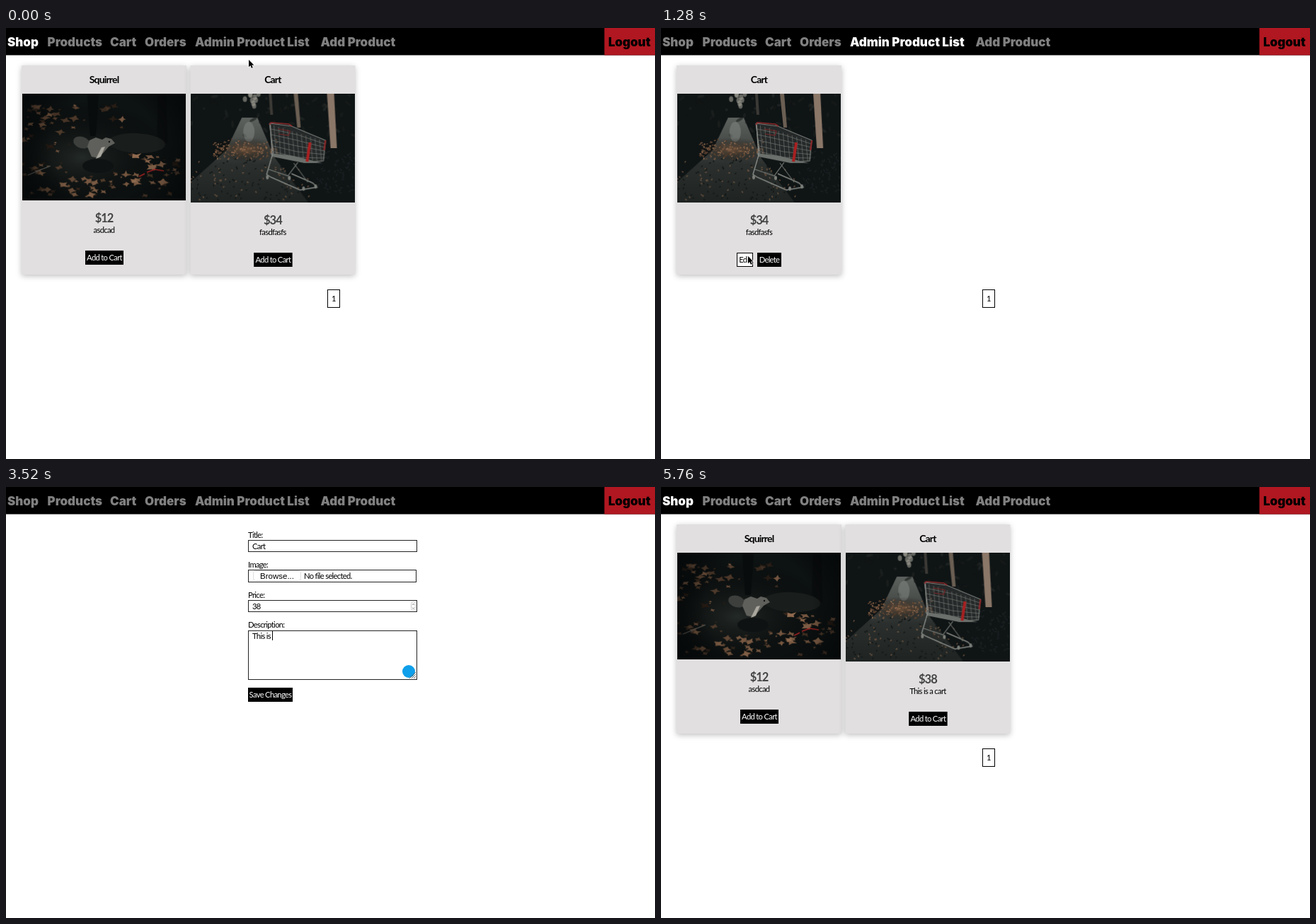
Animation, 917 px wide and 610 px high, one loop 5.92 s. Source, as an HTML page with a canvas:

```html
<!DOCTYPE html>
<html lang="en">
<head>
<meta charset="utf-8">
<title>Shop</title>
<style>
html, body { margin: 0; width: 100%; height: 100%; overflow: hidden; background: #fff; }
canvas { display: block; }
</style>
</head>
<body>
<canvas id="stage" width="917" height="610"></canvas>
<script>
const ctx = document.getElementById('stage').getContext('2d');
const LOOP = 5920;
const GREY = '#808080';

function rng(seed) {
  return () => (seed = (seed * 16807) % 2147483647) / 2147483647;
}

function box(x, y, w, h, fill, stroke) {
  ctx.fillStyle = fill;
  ctx.fillRect(x, y, w, h);
  if (stroke) {
    ctx.strokeStyle = stroke;
    ctx.lineWidth = 1;
    ctx.strokeRect(x + .5, y + .5, w - 1, h - 1);
  }
}

function setFont(weight, size, family, spacing = 0) {
  ctx.font = `${weight} ${size}px ${family}, sans-serif`;
  ctx.letterSpacing = spacing + 'px';
}

// Tight tracking gives the narrow look of the body type.
function text(str, x, y, size = 11.2, color = '#000', align = 'left', weight = 400) {
  setFont(weight, size, 'Lato', -.06 * size);
  ctx.textAlign = align;
  ctx.fillStyle = color;
  ctx.fillText(str, x, y);
}

function button(label, x, y, w, h, hover) {
  box(x, y, w, h, hover ? '#fff' : '#000', '#000');
  text(label, x + w / 2, y + h - 6, 11.2, hover ? '#000' : '#fff', 'center');
}

function picture(w, h, paint) {
  const c = document.createElement('canvas');
  c.width = w;
  c.height = h;
  paint(c.getContext('2d'), w, h);
  return c;
}

function glow(g, x, y, r, color, squash = 1) {
  g.save();
  g.translate(x, y);
  g.scale(1, squash);
  const grad = g.createRadialGradient(0, 0, 0, 0, 0, r);
  grad.addColorStop(0, color);
  grad.addColorStop(1, 'transparent');
  g.fillStyle = grad;
  g.fillRect(-r, -r, 2 * r, 2 * r);
  g.restore();
}

function blob(g, x, y, rx, ry, turn, color) {
  g.fillStyle = color;
  g.beginPath();
  g.ellipse(x, y, rx, ry, turn, 0, 7);
  g.fill();
}

function path(g, pts, color, width, fill) {
  g.beginPath();
  for (let i = 0; i < pts.length; i += 2) g.lineTo(pts[i], pts[i + 1]);
  if (fill) {
    g.fillStyle = fill;
    g.fill();
  }
  if (color) {
    g.strokeStyle = color;
    g.lineWidth = width;
    g.stroke();
  }
}

function brown(tone) {
  return `rgb(${tone | 0},${tone * .74 | 0},${tone * .55 | 0})`;
}

function leaf(g, rand, x, y, r, tone) {
  const pts = [], turn = rand() * 6;
  for (let i = 0; i < 8; i++) {
    const a = turn + i * Math.PI / 4;
    const d = r * (i % 2 ? .3 + rand() * .3 : .7 + rand() * .5);
    pts.push(x + d * Math.cos(a), y + d * .6 * Math.sin(a));
  }
  path(g, pts, null, 0, brown(tone));
}

const squirrelPic = picture(231, 151, (g, w, h) => {
  const rand = rng(41);
  g.fillStyle = '#0d1212';
  g.fillRect(0, 0, w, h);
  glow(g, 85, 90, 130, '#242a28', .6);
  for (let i = 0; i < 170; i++) {
    const x = rand() * 222, y = 14 + rand() * 132;
    const size = 2 + rand() * 6, tone = 35 + rand() * 85;
    const near = x > 68 && x < 150 && y > 52 && y < 112;
    const dark = x > 150 && y < 85 || x > 88 && x < 112 && y < 60;
    if (!near && !dark) leaf(g, rand, x, y, size, tone);
  }
  path(g, [92, 0, 108, 0, 104, 60, 96, 60], null, 0, '#090c0d');
  path(g, [192, 0, 203, 0, 205, 70, 190, 70], null, 0, '#0a0d0e');
  blob(g, 162, 70, 40, 14, .05, '#191d1b');
  blob(g, 107, 102, 22, 10, 0, '#0e1212');
  for (let i = 0; i < 12; i++) {
    leaf(g, rand, 140 + rand() * 58, 88 + rand() * 45, 6 + rand() * 4, 115 + rand() * 35);
    leaf(g, rand, 25 + rand() * 80, 115 + rand() * 28, 5 + rand() * 3, 95 + rand() * 35);
  }
  path(g, [176, 111, 187, 107, 200, 109], '#9c2222', 1.6);
  path(g, [165, 117, 173, 113], '#9c2222', 1.6);
  path(g, [8, 115, 40, 102], '#777873', 1);
  blob(g, 84, 69, 12, 8, .3, '#3c3f3c');
  path(g, [92, 75, 95, 66, 104, 62, 113, 65, 118, 62, 126, 64, 131, 70, 122, 75, 116, 82, 108, 91, 98, 89], null, 0, '#5f605b');
  path(g, [112, 76, 117, 75, 111, 89, 104, 92], null, 0, '#aaa79e');
  blob(g, 123, 68, 1.2, 1.2, 0, '#111');
  const edge = g.createRadialGradient(w / 2, h / 2, 75, w / 2, h / 2, 150);
  edge.addColorStop(0, 'transparent');
  edge.addColorStop(1, 'rgba(4,7,9,.9)');
  g.fillStyle = edge;
  g.fillRect(0, 0, w, h);
});

const cartPic = picture(231, 154, (g, w, h) => {
  const rand = rng(77);
  g.fillStyle = '#0f1415';
  g.fillRect(0, 0, w, h);
  const ground = g.createLinearGradient(0, 34, 0, h);
  ground.addColorStop(0, '#5d625e');
  ground.addColorStop(.3, '#474b48');
  ground.addColorStop(.55, '#2b2f2d');
  ground.addColorStop(1, '#1f2423');
  path(g, [72, 34, 94, 34, 118, 90, 166, 154, 0, 154, 0, 125, 50, 80], null, 0, ground);
  for (let i = 0; i < 60; i++) {
    const tone = 18 + rand() * 24;
    blob(g, rand() * w, rand() * 60, 2 + rand() * 4, 2, rand() * 3, `rgba(${tone},${tone + 4},${tone + 2},.6)`);
  }
  blob(g, 82, 54, 8, 14, 0, 'rgba(125,130,126,.6)');
  for (let i = 0; i < 9; i++) blob(g, 76 + rand() * 22, rand() * 18, 3, 4, 0, 'rgba(160,158,148,.6)');
  path(g, [192, 0, 202, 0, 206, 77, 197, 77], null, 0, '#8b7768');
  path(g, [145, 0, 151, 0, 155, 48, 150, 48], null, 0, '#6b5f53');
  path(g, [110, 0, 114, 0, 116, 30, 112, 30], null, 0, '#3c3a36');
  glow(g, 78, 79, 48, 'rgba(120,84,56,.8)', .35);
  for (let i = 0; i < 190; i++) {
    const x = 32 + rand() * 90, y = 64 + (rand() + rand()) * 16;
    blob(g, x, y, 1.5, .8, rand() * 3, brown(75 + rand() * 80));
  }
  for (let i = 0; i < 150; i++) {
    blob(g, rand() * 170, 92 + rand() * 58, 1.5, .8, rand() * 3, rand() < .4 ? '#6c5440' : '#121716');
  }
  for (let i = 0; i < 70; i++) blob(g, 170 + rand() * 61, 80 + rand() * 60, 2.5, 1, rand() * 3, '#1a2021');
  // shopping cart
  path(g, [111, 42, 142, 46, 190, 66, 187, 95, 160, 97, 117, 87, 111, 42], '#7d807c', 1.1, 'rgba(70,73,70,.4)');
  for (let i = 1; i < 12; i++) {
    const x = 111 + i * 6.4;
    path(g, [x, 43 + i * 2, x + 3, 87 + i * .8], '#777b77', .6);
  }
  for (let i = 1; i < 6; i++) {
    path(g, [112 + i, 42 + i * 8, 150, 50 + i * 8, 189, 66 + i * 5], '#7d817d', .6);
  }
  path(g, [112, 84, 145, 88, 185, 98, 160, 98, 115, 89], null, 0, '#6c706c');
  path(g, [112, 43, 115, 87, 107, 114, 113, 118, 154, 136, 178, 132, 172, 126, 142, 113], '#8b8e89', 1.4);
  path(g, [151, 97, 137, 116, 110, 107], '#7b7e79', 1.2);
  path(g, [145, 98, 165, 125], '#6c706b', 1.1);
  path(g, [111, 44, 113, 41, 138, 43, 143, 46], '#8e2a2b', 1.6);
  path(g, [123, 50, 140, 53, 138, 59, 124, 57], '#742628', 1.2);
  path(g, [168, 69, 164, 96], '#a82021', 4);
  path(g, [190, 66, 188, 80], '#8e282a', 2.2);
  for (const [x, y] of [[108, 118], [139, 119], [159, 134], [176, 131]]) blob(g, x, y, 2, 3, 0, '#7b7e79');
});

const LINKS = [['Shop', 2], ['Products', 58.5], ['Cart', 147], ['Orders', 196], ['Admin Product List', 267], ['Add Product', 444.5]];

function nav(active) {
  box(0, 0, 917, 38.5, '#000');
  box(845.5, 0, 71.5, 38.5, '#b01720');
  setFont(900, 17, 'Inter');
  ctx.textAlign = 'left';
  for (const [label, x] of LINKS) {
    ctx.fillStyle = active.includes(label) ? '#fff' : GREY;
    ctx.fillText(label, x, 25.5);
  }
  ctx.fillStyle = '#000';
  ctx.fillText('Logout', 851, 25.5);
}

function card(x, title, pic, price, note, admin, hover) {
  const mid = x + 116.5, low = 93 + pic.height;
  ctx.save();
  ctx.shadowColor = 'rgba(0,0,0,.26)';
  ctx.shadowBlur = 8;
  ctx.shadowOffsetY = 2;
  box(x, 53, 233, 296, '#e1dfe0');
  ctx.restore();
  text(title, mid, 78, 14, '#000', 'center', 700);
  ctx.drawImage(pic, x + .6, 92.6, 231.6, pic.height + .8);
  text(price, mid, low + 31, 16.5, '#444', 'center', 700);
  text(note, mid, low + 45.5, 11.2, '#000', 'center');
  if (admin) {
    button('Edit', x + 85, low + 71, 23, 20, hover);
    button('Delete', x + 114, low + 71, 34, 20);
  } else {
    button('Add to Cart', x + 90, low + 71, 54, 20);
  }
}

function pager() {
  box(454, 370, 18, 26, '#fff', '#000');
  text('1', 463, 387, 11.2, '#000', 'center');
}

function shop(s) {
  nav(s.link ? ['Shop', 'Admin Product List'] : ['Shop']);
  card(22, 'Squirrel', squirrelPic, '$12', 'asdcad');
  card(260.4, 'Cart', cartPic, '$' + s.price, s.note);
  pager();
}

function admin(s) {
  nav(['Admin Product List']);
  card(22, 'Cart', cartPic, '$34', 'fasdfasfs', true, s.hover);
  pager();
}

function badge(done) {
  const r = done ? 7.5 : 9;
  blob(ctx, 569, 261, r, r, 0, '#109fea');
  if (done) path(ctx, [565.5, 261, 568, 263.5, 572.5, 258.5], '#fff', 1.5);
}

function field(value, y, focused) {
  text(value, 348, y);
  if (focused) box(Math.round(348 + ctx.measureText(value).width), y - 10.5, 1, 13, '#000');
}

function pill(x, y, w, h, color) {
  ctx.beginPath();
  ctx.roundRect(x, y, w, h, 3);
  ctx.strokeStyle = color;
  ctx.lineWidth = 1;
  ctx.stroke();
}

function form(s) {
  nav([]);
  text('Title:', 342, 72);
  box(342, 75, 239, 17, '#fff', '#222');
  field('Cart', 87.5);
  text('Image:', 342, 114);
  box(342, 117, 238, 18, '#fff', '#222');
  pill(349.5, 118.5, 67, 14, '#ddd');
  setFont(400, 11.5, '"Liberation Sans"');
  ctx.textAlign = 'center';
  ctx.fillStyle = '#000';
  ctx.fillText('Browse...', 383, 130);
  text('No file selected.', 421, 130);
  text('Price:', 342, 157);
  box(342, 160, 239, 17, '#fff', '#222');
  field(String(s.price), 172.5, s.focus === 'price');
  pill(572.5, 162.5, 6, 12, '#ccc');
  path(ctx, [574, 167, 575.5, 165, 577, 167], '#777', .8);
  path(ctx, [574, 170.5, 575.5, 172.5, 577, 170.5], '#777', .8);
  text('Description:', 342, 199);
  box(342, 203, 239, 70, '#fff', '#222');
  if (s.select) box(348, 204, 39, 13, '#b4d5fe');
  field(s.note, 214.5, s.focus === 'note');
  if (s.badge) badge(s.badge === 'done');
  for (let i = 0; i < 3; i++) path(ctx, [570 + i * 3, 271, 579, 262 + i * 3], '#555', .9);
  button('Save Changes', 342, 284, 63, 20, s.hover);
}

function pointer([x, y]) {
  const tip = [0, 0, 0, 10.2, 2.3, 8.1, 3.9, 11.8, 5.8, 11, 4.2, 7.4, 7.4, 7.4, 0, 0];
  ctx.save();
  ctx.translate(x, y);
  path(ctx, tip, '#fff', 1.4);
  path(ctx, tip, null, 0, '#000');
  ctx.restore();
}

// Each entry changes only the listed properties.
const STEPS = [
  [0, { page: shop, price: 34, note: 'fasdfasfs', at: [343, 45] }],
  [160, { at: [227, 195] }],
  [320, { at: [325, 21], link: true }],
  [640, { page: admin }],
  [800, { at: [296, 94] }],
  [960, { at: [215, 190] }],
  [1120, { at: [143, 296] }],
  [1280, { at: [123, 323], hover: true }],
  [1440, { page: form, hover: false }],
  [1600, { at: [330, 336] }],
  [1760, { at: [372, 225] }],
  [1920, { at: [366, 165], focus: 'price' }],
  [2080, { at: null, price: 3 }],
  [2240, { price: 38 }],
  [2400, { at: [372, 180], focus: null }],
  [2560, { at: [392, 208], focus: 'note', badge: 'done' }],
  [2720, { at: [388, 207] }],
  [2880, { at: [346, 166], select: true, focus: null }],
  [3040, { at: [306, 128] }],
  [3200, { at: null, select: false, focus: 'note', note: 'Th', badge: 'busy' }],
  [3360, { note: 'This i' }],
  [3520, { note: 'This is ' }],
  [3680, { note: 'This is a' }],
  [3840, { note: 'This is a ' }],
  [4000, { note: 'This is a ca' }],
  [4160, { note: 'This is a cart' }],
  [4320, { at: [307, 228], badge: 'done' }],
  [4480, { at: [348, 276] }],
  [4640, { at: [381, 297], hover: true, focus: null }],
  [5120, { page: shop, link: false }],
  [5280, { at: [386, 325] }],
  [5440, { at: [402, 425] }],
  [5600, { at: [420, 558] }],
  [5760, { at: null }]
];

function draw(now) {
  const t = now % LOOP;
  const s = {};
  for (const [ms, change] of STEPS) if (ms <= t) Object.assign(s, change);
  box(0, 0, 917, 610, '#fff');
  s.page(s);
  if (s.at) pointer(s.at);
}

const start = performance.now();
function tick() {
  draw(performance.now() - start);
  requestAnimationFrame(tick);
}
tick();
</script>
</body>
</html>
```
